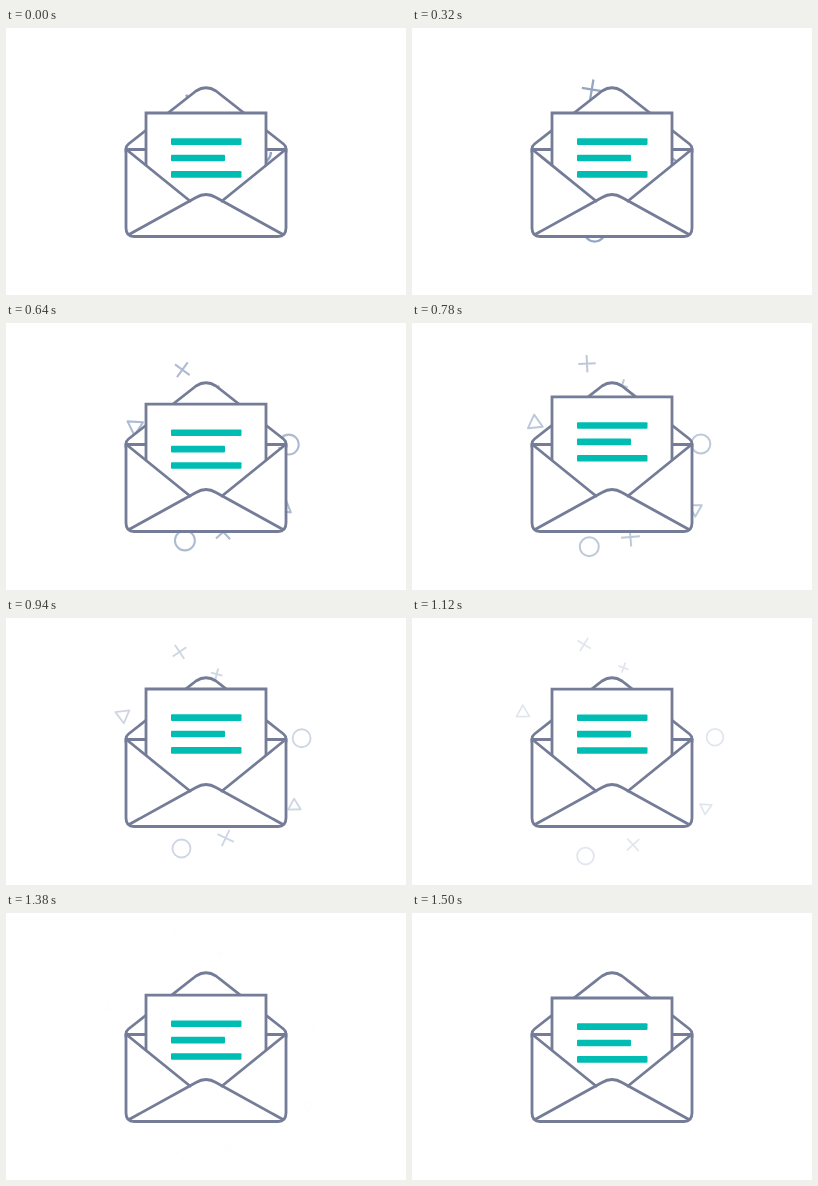
An HTML page that plays this animation: 400 px wide and 267 px high, repeating every 2020 ms.

```html
<!DOCTYPE html>
<html lang="en">
<head>
<meta charset="utf-8">
<title>Envelope</title>
<style>
  html, body { margin: 0; width: 100%; height: 100%; overflow: hidden; background: #fff; }
  svg { display: block; width: 100vw; height: 100vh; }
  .ink { stroke: #747c97; stroke-width: 2.8; stroke-linejoin: round; stroke-linecap: round; }
  #bits { fill: none; stroke: #94a6c2; stroke-width: 2.5; stroke-linejoin: round; }
</style>
</head>
<body>
<svg viewBox="0 0 400 267">
  <g id="bits"></g>
  <g class="ink" fill="#fff">
    <path d="M120 124V121Q120 118 122.5 116L190 63Q200 56.5 210 63L277.5 116Q280 118 280 121V124"/>
    <path d="M121 121.5H279"/>
  </g>
  <g id="letter">
    <path class="ink" style="stroke-linejoin: miter" fill="#fff" d="M140 85H260V205H140Z"/>
    <g fill="#00bdb3">
      <rect x="165" y="110.3" width="70.5" height="6.6" rx="1"/>
      <rect x="165" y="126.7" width="54" height="6.6" rx="1"/>
      <rect x="165" y="143.1" width="70.5" height="6.6" rx="1"/>
    </g>
  </g>
  <path fill="#fff" d="M120 121L184 173L190 169.5Q200 163.5 210 169.5L216 173L280 121V200Q280 208.5 272 208.5H128Q120 208.5 120 200Z"/>
  <g class="ink" fill="none">
    <path d="M120 121V200Q120 208.5 128 208.5H272Q280 208.5 280 200V121"/>
    <path d="M121 122L184 173M279 122L216 173"/>
    <path d="M123 206.5L190 169.5Q200 163.5 210 169.5L277 206.5"/>
  </g>
</svg>
<script>
const LOOP = 2020;
const START = performance.now();
const letter = document.getElementById('letter');
const bits = document.getElementById('bits');

const cross = r => `M${-r} 0H${r}M0 ${-r}V${r}`;
const ring = r => `M${-r} 0A${r} ${r} 0 1 1 ${r} 0A${r} ${r} 0 1 1 ${-r} 0Z`;
const tri = r => `M0 ${-r}L${r * 0.866} ${r / 2}H${-r * 0.866}Z`;

// x and y at the three KNOTS times; angle at 640 ms; spin in degrees per ms
const KNOTS = [320, 780, 1260];
const shapes = [
  { d: cross(11), x: [179.8, 175, 171], y: [61.5, 40.7, 21], angle: 35.8, spin: 0.365 },
  { d: cross(7.8), x: [208, 210, 212.2], y: [82, 62.3, 45], angle: 35, spin: 0.53 },
  { d: cross(12), x: [215, 218.4, 222.2], y: [197, 214, 232], angle: 48, spin: -0.375 },
  { d: ring(12), x: [268.2, 288.8, 308.5], y: [122.8, 121, 118.5], angle: 0, spin: 0 },
  { d: ring(12), x: [182.7, 177.3, 172], y: [202.5, 223.6, 243.5], angle: 0, spin: 0 },
  { d: tri(10.8), x: [145, 123, 107], y: [112.5, 100.2, 93.4], angle: 63, spin: 0.365 },
  { d: tri(9.6), x: [267, 283.2, 297.5], y: [181, 186, 191.5], angle: 8, spin: 0.367 }
];

for (const s of shapes) {
  s.el = document.createElementNS('http://www.w3.org/2000/svg', 'path');
  s.el.setAttribute('d', s.d);
  bits.append(s.el);
}

const clamp = v => Math.min(1, Math.max(0, v));
const ease = v => (1 - Math.cos(Math.PI * clamp(v))) / 2;

// Parabola through the three knots
function curve([a, b, c], t) {
  const [p, q, r] = KNOTS;
  const m = (b - a) / (q - p);
  const n = (c - b) / (r - q);
  return a + m * (t - p) + (n - m) / (r - p) * (t - p) * (t - q);
}

function draw(t) {
  const lift = 14 * (ease((t - 500) / 400) - ease((t - 1100) / 400));
  letter.setAttribute('transform', `translate(0 ${-lift})`);
  bits.setAttribute('opacity', clamp((1400 - t) / 1000));
  const scale = 1 - 0.4 * clamp(t / 1500);
  for (const s of shapes) {
    const turn = s.angle + s.spin * (t - 640);
    s.el.setAttribute('transform',
      `translate(${curve(s.x, t)} ${curve(s.y, t)}) rotate(${turn}) scale(${scale})`);
  }
}

function tick() {
  draw((performance.now() - START) % LOOP);
  requestAnimationFrame(tick);
}
draw(0);
requestAnimationFrame(tick);
</script>
</body>
</html>
```
